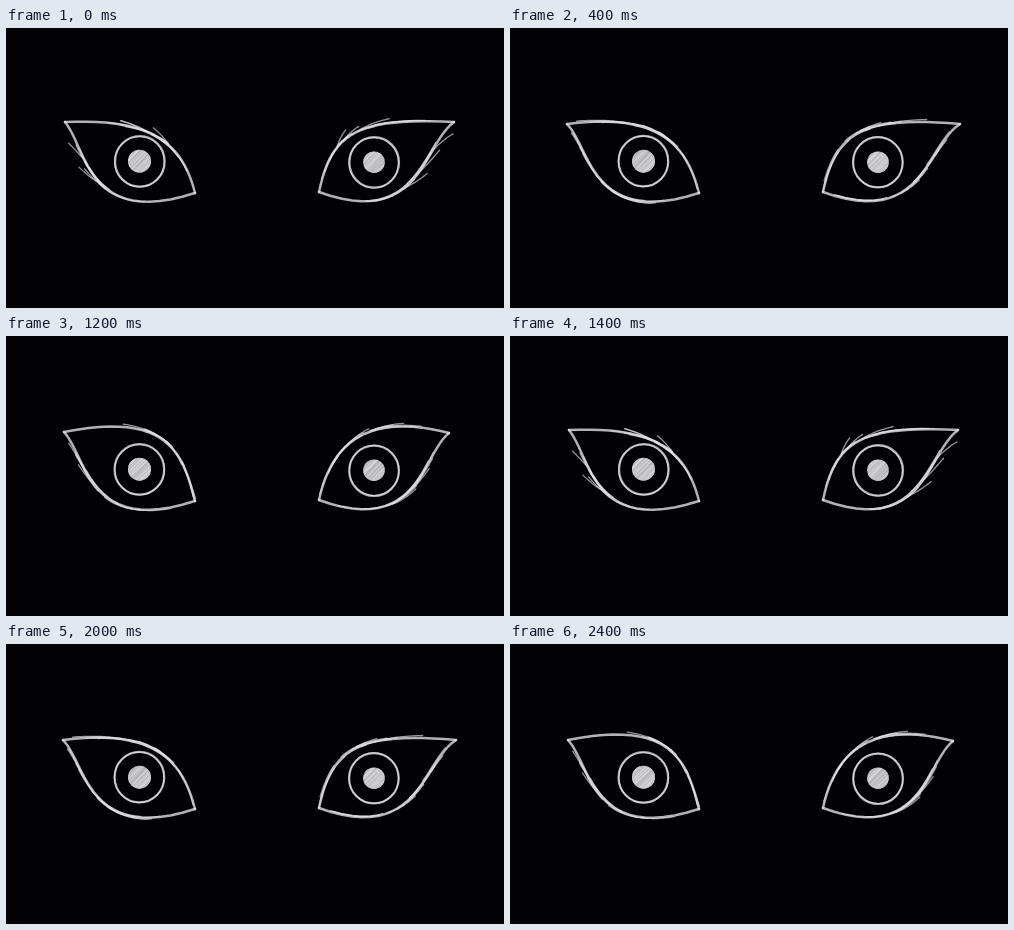
An HTML page with a canvas that plays this animation: 498 px wide and 280 px high, repeating every 2600 ms.

```html
<!DOCTYPE html>
<html lang="en">
<head>
<meta charset="utf-8">
<title>Sketched eyes</title>
<style>
html, body { margin: 0; width: 100%; height: 100%; overflow: hidden; background: #020204; }
canvas { display: block; width: 498px; height: 280px; }
</style>
</head>
<body>
<canvas id="stage" width="498" height="280"></canvas>
<script>
const W = 498, H = 280, LOOP = 2600;

// Parts that hold still: inner corner, lid control points, iris centre and pupil size.
const leftEye = {
  inner: [189, 165], lash: [177, 118], bag: [82, 200], cheek: [81, 121],
  centre: [133.5, 133.5], pupil: 11.5
};
const rightEye = {
  inner: [313, 164], lash: [326, 103], bag: [413, 201], cheek: [417, 117],
  centre: [368, 134.5], pupil: 10.8
};

// Each drawing moves the outer corner and the brow; flare is how far loose strokes stray.
const poses = {
  wild: { flare: 9, left: { outer: [59, 94], brow: [150, 90] }, right: { outer: [448, 94], brow: [352, 90] } },
  calm: { flare: 3, left: { outer: [57, 96], brow: [150, 84] }, right: { outer: [450, 96], brow: [352, 88] } },
  narrow: { flare: 4, left: { outer: [66, 93], brow: [150, 98] }, right: { outer: [441, 92], brow: [356, 82] } },
  sharp: { flare: 4, left: { outer: [58, 96], brow: [163, 75] }, right: { outer: [443, 97], brow: [366, 77] } }
};

const timeline = [
  [0, 'wild'], [400, 'calm'], [800, 'narrow'], [1200, 'sharp'],
  [1400, 'wild'], [1800, 'narrow'], [2000, 'calm'], [2400, 'sharp']
];

function seeded(seed) {
  return () => (seed = (seed * 16807) % 2147483647) / 2147483647;
}

// Point on a cubic curve, pushed away from the centre by the given distance.
function pointOn([a, b, c, d], t, centre, push) {
  const u = 1 - t;
  const at = i => u * u * u * a[i] + 3 * u * u * t * b[i] + 3 * u * t * t * c[i] + t * t * t * d[i];
  const slope = i => u * u * (b[i] - a[i]) + 2 * u * t * (c[i] - b[i]) + t * t * (d[i] - c[i]);
  const x = at(0), y = at(1), dx = slope(0), dy = slope(1);
  const outward = Math.sign(dy * (x - centre[0]) - dx * (y - centre[1]));
  const scale = outward * push / Math.hypot(dx, dy);
  return [x + dy * scale, y - dx * scale];
}

function drawPose({ flare, left, right }, seed) {
  const sheet = document.createElement('canvas');
  sheet.width = W;
  sheet.height = H;
  const g = sheet.getContext('2d');
  const random = seeded(seed);
  const between = (low, high) => low + random() * (high - low);
  g.fillStyle = '#020204';
  g.fillRect(0, 0, W, H);
  g.lineCap = g.lineJoin = 'round';
  g.filter = 'blur(0.4px)';

  function stroke(width, alpha) {
    g.lineWidth = width;
    g.strokeStyle = `rgba(228,228,230,${alpha})`;
    g.stroke();
  }

  function pencil(curve, centre, from, to, startPush, endPush, width, alpha) {
    const steps = 24;
    g.beginPath();
    for (let i = 0; i <= steps; i++) {
      const k = i / steps;
      const push = startPush + (endPush - startPush) * k;
      g.lineTo(...pointOn(curve, from + (to - from) * k, centre, push));
    }
    stroke(width, alpha);
  }

  function lid(curve, centre) {
    pencil(curve, centre, 0, 1, 0, 0, 2.5, 0.78);
    for (let i = 0; i < 7; i++) {
      const from = between(0, 0.65);
      pencil(curve, centre, from, from + between(0.2, 0.35),
        between(-1.4, 1.6), between(-1.4, 1.6), 1.2, 0.6);
    }
    for (let i = 0; i < 3; i++) {
      const from = between(0.3, 0.75);
      pencil(curve, centre, from, from + between(0.12, 0.22),
        0.5, between(0.4, 1) * flare, 1.3, 0.65);
    }
  }

  function iris([x, y]) {
    for (const width of [2.2, 1.2]) {
      g.beginPath();
      g.ellipse(x + between(-0.4, 0.4), y + between(-0.4, 0.4), 24.8, 25.2, 0, 0, Math.PI * 2);
      stroke(width, 0.75);
    }
  }

  function pupil([x, y], r) {
    g.save();
    g.beginPath();
    g.arc(x, y - 0.3, r, 0, Math.PI * 2);
    g.fillStyle = '#b4b4b7';
    g.fill();
    g.clip();
    for (let d = -2 * r; d < 2 * r; d += 2) {
      g.beginPath();
      g.moveTo(x + d - r, y + r);
      g.lineTo(x + d + r + between(-2, 2), y - r);
      stroke(1.3, between(0.1, 0.8));
    }
    g.restore();
  }

  for (const eye of [{ ...leftEye, ...left }, { ...rightEye, ...right }]) {
    lid([eye.inner, eye.lash, eye.brow, eye.outer], eye.centre);
    lid([eye.inner, eye.bag, eye.cheek, eye.outer], eye.centre);
    iris(eye.centre);
    pupil(eye.centre, eye.pupil);
  }
  return sheet;
}

const sheets = {};
Object.keys(poses).forEach((name, i) => {
  sheets[name] = drawPose(poses[name], 417733 + i * 91939);
});

const stage = document.getElementById('stage').getContext('2d');
const start = performance.now();

function play(now) {
  const time = Math.max(0, now - start) % LOOP;
  const [, name] = timeline.filter(([from]) => from <= time).pop();
  stage.drawImage(sheets[name], 0, 0);
  requestAnimationFrame(play);
}
play(start);
</script>
</body>
</html>
```
